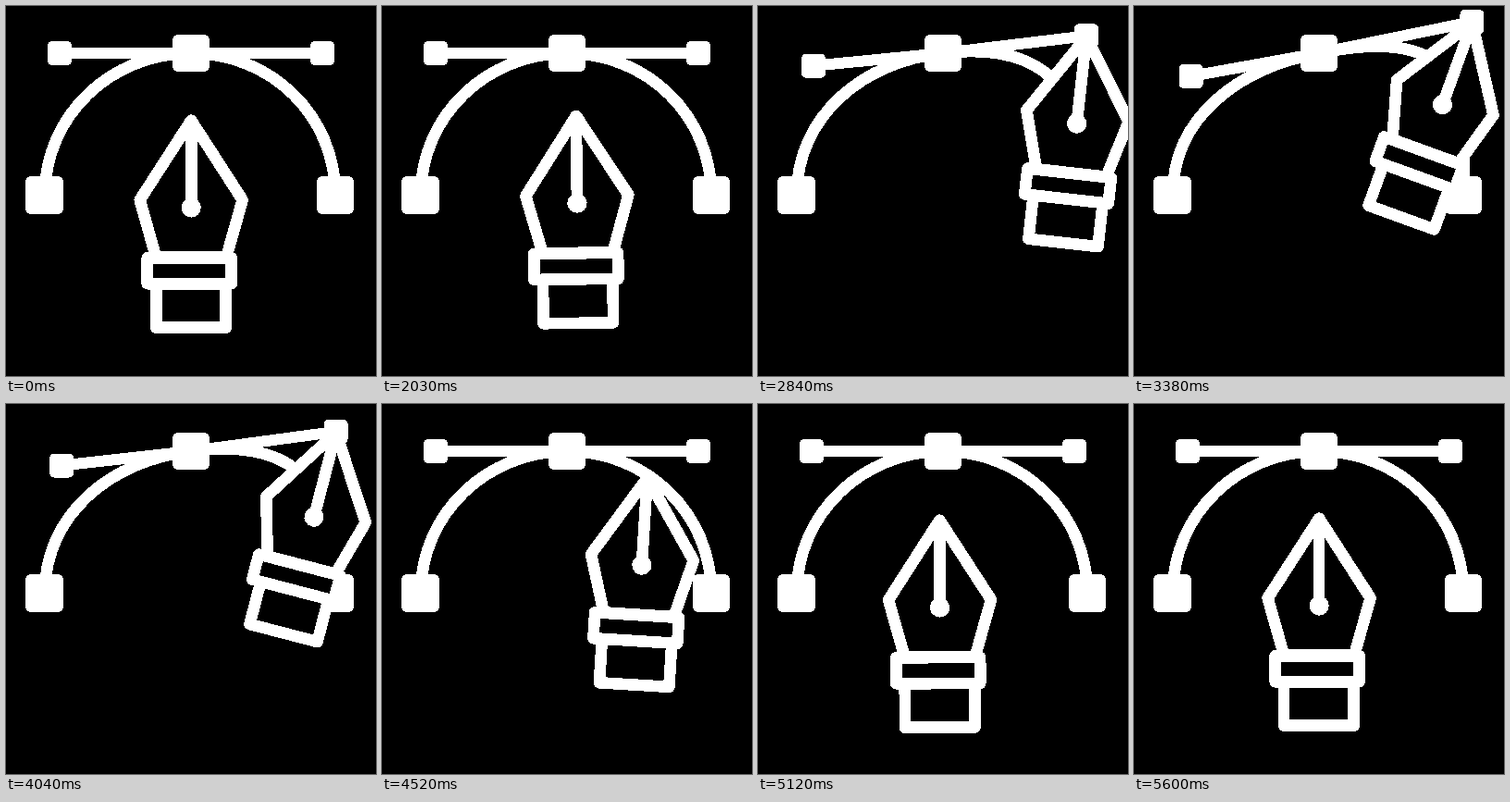
Recreate the animation shown at these times as an HTML page. Size 400 by 400 pixels, loop 5.63 s.

```html
<!DOCTYPE html>
<html lang="en">
<head>
<meta charset="utf-8">
<title>Pen tool</title>
<style>
  html, body { margin: 0; width: 100%; height: 100%; overflow: hidden; background: #000; }
  svg { display: block; width: 100vw; height: 100vh; shape-rendering: crispEdges; }
  .line { fill: none; stroke: #fff; stroke-width: 12.6; stroke-linecap: round; stroke-linejoin: round; }
  .solid { fill: #fff; }
  #bar { stroke-width: 12; }
  #pen path { fill: #000; }
</style>
</head>
<body>
<svg viewBox="0 0 400 400">
  <path id="curve" class="line"/>
  <path id="bar" class="line"/>
  <g class="solid">
    <rect x="21" y="184" width="41" height="41" rx="6"/>
    <rect x="336" y="184" width="40" height="41" rx="6"/>
    <rect x="180" y="31" width="40" height="40" rx="6"/>
    <rect id="left" x="-13" y="-13" width="26" height="26" rx="5"/>
    <rect id="right" x="-13" y="-13" width="26" height="26" rx="5"/>
  </g>
  <!-- the nib's tip is the local origin -->
  <g id="pen">
    <path class="line" d="M-38 176.5H37.5V224H-38Z"/>
    <path class="line" d="M0 0L55.5 86L38 148H-38L-55.5 86Z"/>
    <path class="line" d="M-47.5 148.5H43.5V176.5H-47.5Z"/>
    <path class="line" d="M0 0V94"/>
    <circle class="solid" cy="94.3" r="10.6"/>
  </g>
</svg>
<script>
  const LOOP = 5630;
  const REACH = 2010, GRAB = 2558, PEAK = 3420, DROP = 4310, HOME = 4850;
  const $ = id => document.getElementById(id);
  const curve = $('curve'), bar = $('bar'), left = $('left'), right = $('right'), pen = $('pen');
  const span = (t, a, b) => Math.min(1, Math.max(0, (t - a) / (b - a)));
  const out = (u, k) => 1 - (1 - u) ** k;
  const move = (el, [x, y], turn = 0) =>
    el.setAttribute('transform', `translate(${x} ${y}) rotate(${turn})`);

  // how far the handle is pulled, 0 to 1
  const pull = t => t < PEAK ? out(span(t, GRAB, PEAK), 2) : 1 - span(t, PEAK, DROP) ** 2.7;

  // how far the pen is from home: 1 is at the handle, below 0 is overshoot
  function away(t) {
    if (t < PEAK) return out(span(t, REACH, GRAB), 1.8);
    if (t < HOME) return 1 - span(t, DROP, HOME);
    const s = (t - HOME) / 100;
    return -0.153 * s * Math.exp(-s);
  }

  function draw(t) {
    const p = pull(t), q = away(t);
    const l = [58 + 3.7 * p, 51 + 25 * p];
    const r = [342 + 23.5 * p, 51 - 34 * p];
    const toward = ([x, y], s) => `${200 + (x - 200) * s} ${51 + (y - 51) * s}`;

    bar.setAttribute('d', `M${l}L200 51L${r}`);
    curve.setAttribute('d', `M42 204C42 119 ${toward(l, 0.613)} 200 51` +
      `C${toward(r, 0.613 + 0.45 * p)} 356 119 356 204`);
    move(left, l);
    move(right, r);

    const rest = t < PEAK ? -10.2 : 5.8;
    const turn = rest * q + (20 - rest) * p;
    const tip = [200.2 + 142 * q + r[0] - 342, 123.7 - 71.7 * q + r[1] - 51];
    move(pen, tip, turn);
  }

  function tick() {
    draw(performance.now() % LOOP);
    requestAnimationFrame(tick);
  }
  tick();
</script>
</body>
</html>
```
